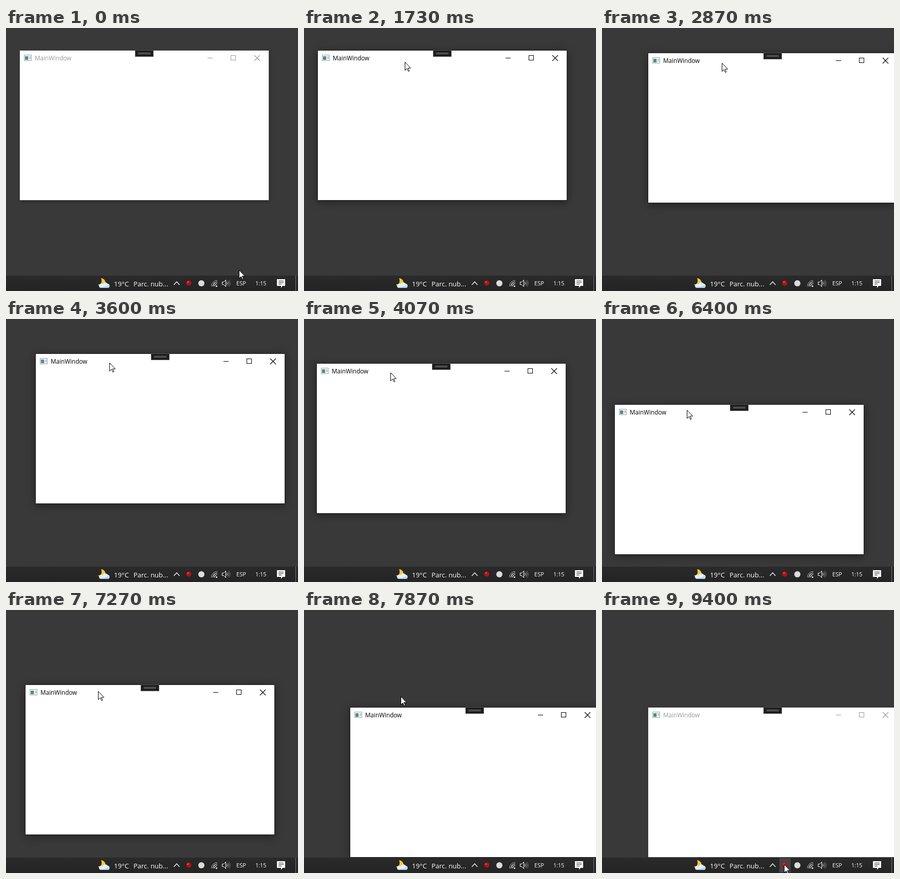
An HTML page for the animation above (9540 ms loop, 568x512 px).

```html
<!DOCTYPE html>
<html lang="es">
<head>
<meta charset="utf-8">
<title>Window drag</title>
<style>
html, body { margin: 0; width: 100%; height: 100%; overflow: hidden; background: #393939; }
#stage { position: relative; width: 568px; height: 512px; overflow: hidden; background: #393939; }
#stage > * { position: absolute; left: 0; top: 0; }
svg { display: block; overflow: visible; }
text { font-family: "Open Sans", "Noto Sans", sans-serif; }
#win {
  width: 484px; height: 291px; background: #fff; color: #000;
  box-shadow: 0 0 0 1px rgba(0,0,0,.32), 0 3px 15px 1px rgba(0,0,0,.42);
}
#win.idle { color: #999; box-shadow: 0 0 0 1px #4c4c4c, 1px 2px 6px rgba(0,0,0,.4); }
#win .buttons { fill: none; stroke: currentColor; }
#win text { font-size: 11.7px; fill: currentColor; }
#bar { top: 482px; width: 568px; height: 30px; background: linear-gradient(#2a2a2a, #242424); }
#bar text { fill: #fff; font-weight: 500; }
#hover { visibility: hidden; }
</style>
</head>
<body>
<div id="stage">
  <div id="win">
    <svg width="484" height="291">
      <rect x="8.5" y="8.5" width="14" height="11" fill="#f4f4f4" stroke="#a3a8aa"/>
      <rect x="10" y="11" width="6" height="7" fill="#4b8f88"/>
      <path d="M17.5 11v7" stroke="#c9d3d8"/>
      <rect x="19" y="11" width="2" height="5" fill="#aebfd2"/>
      <text x="29" y="19">MainWindow</text>
      <g class="buttons">
        <path d="M365 14.5h10M410.5 9.5h9v9h-9z" shape-rendering="crispEdges"/>
        <path d="M456 9l11 11m0-11l-11 11" stroke-width="1.1"/>
      </g>
      <rect x="224.5" y="-.5" width="35" height="12" fill="#1e1e1e" stroke="#505050"/>
      <path d="M230 4.5h24m-24 2h24" stroke="#777"/>
    </svg>
  </div>
  <div id="bar">
    <svg width="568" height="30">
      <rect id="hover" x="345" y="1" width="22" height="28" fill="#444"/>
      <path d="M185 5c7 1 10 7 8 12-3 6-11 6-14 0 5 1 9-3 6-12z" fill="#fcc934"/>
      <path d="M185 24a4 4 0 0 1 0-8 4 4 0 0 1 3 1 5.500 5.500 0 0 1 10-1 4 4 0 0 1-1 8z" fill="#e3f1fb"/>
      <path d="M185 24a4 4 0 0 1-3-2q10 1 18-4a4 4 0 0 1-3 6z" fill="#b4d9f3"/>
      <text x="210" y="21" font-size="13.2">19°C</text>
      <text x="248" y="21" font-size="13">Parc. nub...</text>
      <path d="M326.500 18l5.500-6 5.500 6" fill="none" stroke="#fff" stroke-width="1.200"/>
      <circle cx="355.500" cy="14.500" r="5" fill="#b80f14"/>
      <circle cx="354" cy="12.500" r="1.600" fill="#e0575b"/>
      <circle cx="380" cy="15" r="6" fill="#dcdcdc"/>
      <g fill="none" stroke="#fff">
        <path d="M399.500 21a11.500 11.500 0 0 1 11.500-11.500" stroke="#bbb"/>
        <path d="M402.500 21a8.500 8.500 0 0 1 8.500-8.500M405.500 21a5.500 5.500 0 0 1 5.500-5.500" stroke-width="1.200"/>
        <path d="M420.500 12.500h3l4-4v13l-4-4h-3z"/>
        <path d="M429.500 12.500q2 2.500 0 5"/>
        <path d="M431.500 10.500q4 4.500 0 9" stroke="#aaa"/>
        <path d="M433.500 8.500q5.500 6.500 0 13" stroke="#777"/>
      </g>
      <circle cx="409.500" cy="20.500" r="1.500" fill="#fff"/>
      <text x="448" y="19" font-size="11.1">ESP</text>
      <text x="485" y="19" font-size="10.8">1:15</text>
      <path d="M527 7h16v13h-5l-3 4v-4h-8z" fill="#fff"/>
      <path d="M530 10.500h10m-10 3h10m-10 3h6" stroke="#262626"/>
      <path d="M563.500 0v30" stroke="#777"/>
    </svg>
  </div>
  <svg id="cursor" width="12" height="19">
    <path d="M.5.5v16l3.700-3.600 2.800 5.600 2-1-2.600-5.400h5.100z" fill="#fff" stroke="#000"/>
  </svg>
</div>
<script>
const LOOP = 9540;
const TICK = 1000 / 15; // the picture changes 15 times a second; times below are in ticks
const LAG = 0.1;        // a dragged window trails the pointer slightly

const linear = p => p;
const speedUp = p => p * p;
const slowDown = p => p * (2 - p);
const smooth = p => p * p * (3 - 2 * p);

class Mover {
  constructor(id, x, y) {
    this.el = document.getElementById(id);
    this.start = this.end = { x, y };
    this.moves = [];
  }
  to(t0, t1, x, y, ease) {
    this.moves.push({ t0, t1, from: this.end, to: { x, y }, ease });
    this.end = { x, y };
  }
  show(t) {
    let { x, y } = this.start;
    for (const { t0, t1, from, to, ease } of this.moves) {
      if (t < t0) break;
      const p = ease(Math.min(1, (t - t0) / (t1 - t0)));
      x = from.x + (to.x - from.x) * p;
      y = from.y + (to.y - from.y) * p;
    }
    this.el.style.transform = `translate(${Math.round(x)}px, ${Math.round(y)}px)`;
  }
}

const cursor = new Mover('cursor', 453, 471);
const win = new Mover('win', 27, 44);
const hover = document.getElementById('hover');

const point = (t0, t1, x, y, ease = smooth) => cursor.to(t0, t1, x, y, ease);
const fling = (t0, t1, x, y, ease = linear) => win.to(t0, t1, x, y, ease);

function drag(t0, t1, x, y, ease) {
  const wx = win.end.x + x - cursor.end.x;
  const wy = win.end.y + y - cursor.end.y;
  cursor.to(t0, t1, x, y, ease);
  win.to(t0 + LAG, t1 + LAG, wx, wy, ease);
}

point(0, 15, 200, 72);
point(15, 18, 195, 66);

drag(25, 33, 229, 71, speedUp);
fling(33, 39, 90, 49, slowDown);
point(40, 43, 233, 68);
point(43, 45, 233, 66);

drag(47, 61, 168, 104, smooth);
drag(62, 72, 172.45, 169.5, speedUp);
fling(72, 76, 28, 190);
point(77, 89, 168, 201);

drag(93.5, 99, 161, 145, smooth);
drag(104, 109, 179, 158, speedUp);
drag(109, 110, 187, 166, linear);
fling(110, 114, 90, 190);
point(116, 118, 188, 168);
point(125, 140, 354, 495);

const begin = performance.now();

function draw() {
  const now = (performance.now() - begin) % LOOP;
  const t = Math.floor((now + 5) / TICK);
  cursor.show(t);
  win.show(t);
  win.el.className = t < 22 || t >= 141 ? 'idle' : '';
  hover.style.visibility = t >= 139 ? 'visible' : 'hidden';
  requestAnimationFrame(draw);
}
draw();
</script>
</body>
</html>
```
